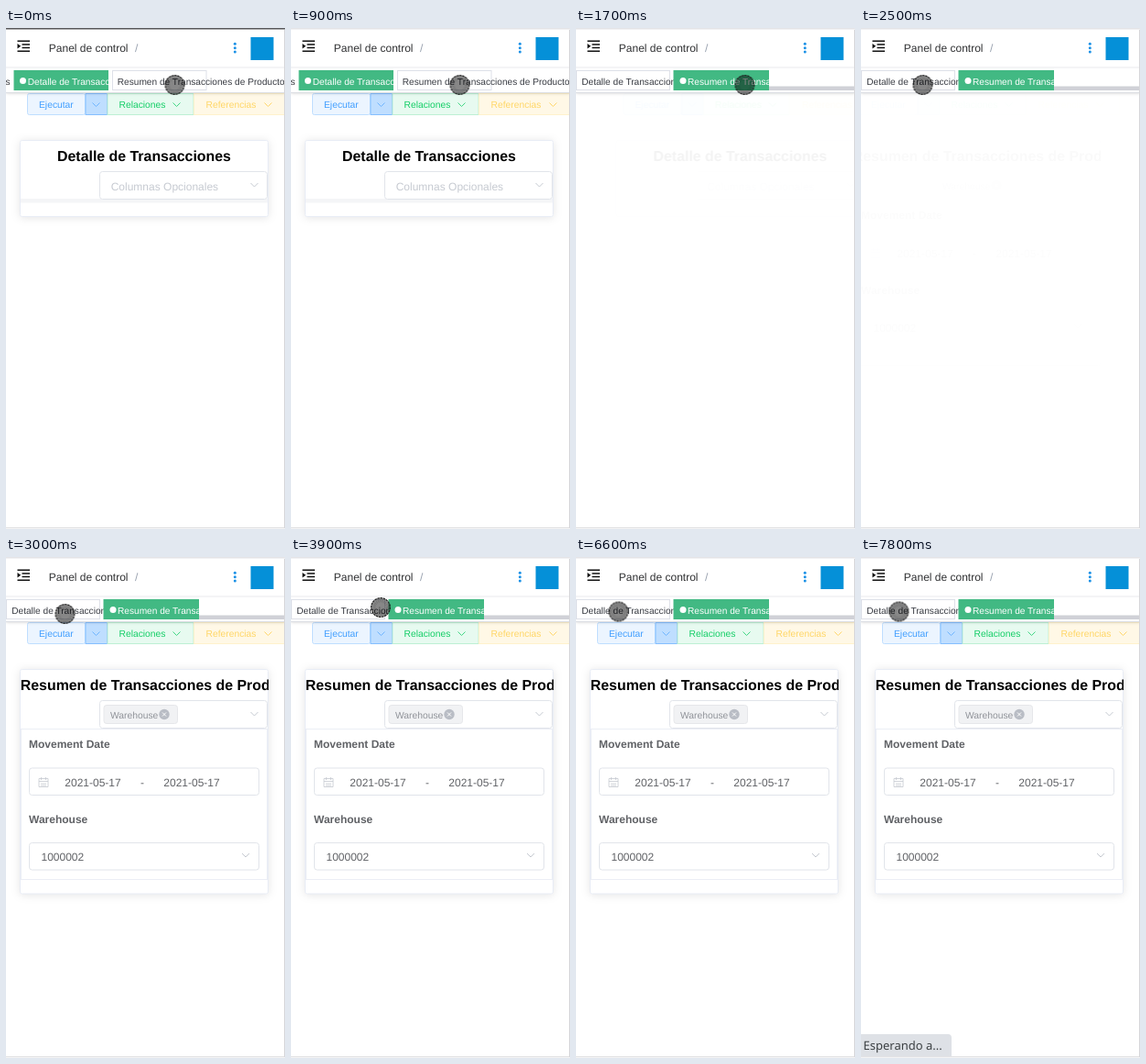
An HTML page that plays this animation: 305 by 546 pixels, repeating every 8000 ms.

```html
<!DOCTYPE html>
<html lang="es">
<head>
<meta charset="utf-8">
<title>Panel de control</title>
<style>
html, body { margin: 0; width: 100%; height: 100%; overflow: hidden; background: #fff; }
svg { display: block; width: 305px; height: 546px; }
text {
  font: 12px "Liberation Sans", Arial, sans-serif; fill: #303133;
  white-space: pre; text-rendering: geometricPrecision;
}
.title { font-size: 15.9px; font-weight: bold; fill: #000; }
.label { font-weight: bold; fill: #606266; }
.value { fill: #606266; }
.hint { fill: #c6cad1; }
.btn text { font-size: 10.3px; }
.tab text { font-size: 10.15px; fill: #3a3d44; }
.tab rect { fill: #fff; stroke: #dde0e8; }
.on text { fill: #fff; }
.on rect { fill: #42b983; stroke: #42b983; }
.on circle { fill: #fff; }
.chev { fill: none; stroke: #c6cad1; }
.card { fill: #fff; stroke: #e8ecf5; filter: drop-shadow(0 1px 5px rgba(0,0,0,.1)); }
.box { fill: #fff; stroke: #e1e4ea; }
.tip { font: 13px "Noto Sans", "Open Sans", sans-serif; fill: #3c4043; }

.top, .before, .after, .tap, .glow, .bar, .old, .new, .cursor, .status {
  animation: 8s step-end infinite;
}
.top { animation-name: top; }
.before { animation-name: before; }
.after { animation-name: after; }
.tap { animation-name: tap; }
.glow { animation-name: glow; }
.bar { animation-name: bar; }
.old { animation-name: leave; }
.new { animation-name: enter; }
.cursor { animation-name: cursor; }
.status { animation-name: status; }

@keyframes top { 0% { fill: #58585b; } 11.25%, 100% { fill: #e4e4e7; } }
@keyframes before { 0% { opacity: 1; } 17.5%, 100% { opacity: 0; } }
@keyframes after { 0% { opacity: 0; } 17.5%, 100% { opacity: 1; } }
@keyframes tap {
  0% { opacity: 0; } 17.5% { opacity: .4; } 18.75% { opacity: .3; }
  20% { opacity: .15; } 21.25%, 100% { opacity: 0; }
}
@keyframes glow { 0% { opacity: 0; } 17.5% { opacity: 1; } 20%, 100% { opacity: 0; } }
@keyframes bar { 0% { opacity: 0; } 18.75%, 100% { opacity: 1; } }
@keyframes leave {
  0% { opacity: 1; transform: none; }
  17.5% { opacity: .82; transform: translateX(4px); }
  18.75% { opacity: .38; transform: translateX(18.5px); }
  20% { opacity: .16; transform: translateX(25px); }
  21.25% { opacity: .05; transform: translateX(28.5px); }
  22.5%, 100% { opacity: 0; transform: translateX(30px); }
}
@keyframes enter {
  0% { opacity: 0; transform: translateX(-30px); }
  22.5% { opacity: .02; transform: translateX(-25px); }
  36.25% { opacity: .93; transform: translateX(-1px); }
  37.5%, 100% { opacity: 1; transform: none; }
}
@keyframes cursor {
  0% { transform: translate(184.5px, 62px); }
  27.5% { transform: translate(176px, 62px); }
  28.75% { transform: translate(146px, 62px); }
  30% { transform: translate(95px, 62px); }
  31.25% { transform: translate(67.5px, 62px); }
  36.25% { transform: translate(65px, 62px); }
  37.5% { transform: translate(64.5px, 62px); }
  47.5% { transform: translate(75px, 60px); }
  48.75% { transform: translate(98px, 55px); }
  50% { transform: translate(80px, 52px); }
  51.25% { transform: translate(56px, 52px); }
  53.75% { transform: translate(119px, 51px); }
  56.25% { transform: translate(132.5px, 52px); }
  82.5% { transform: translate(46.5px, 59.5px); }
  83.75% { transform: translate(43px, 60px); }
  85%, 100% { transform: translate(41.5px, 59.5px); }
}
@keyframes status { 0% { opacity: 0; } 97.5%, 100% { opacity: 1; } }
</style>
</head>
<body>
<svg viewBox="0 0 305 546">
  <defs>
    <path id="chev" d="M-4-2L0 2L4-2"/>
    <g id="buttons" class="btn">
      <rect x="23.5" y="71.5" width="63" height="23" rx="2" fill="#ecf5ff" stroke="#bfdeff"/>
      <rect x="87" y="71.5" width="23.5" height="23" fill="#bfdeff" stroke="#85bfff"/>
      <rect x="111" y="71.5" width="94" height="23" fill="#e7faf0" stroke="#bdf0d4"/>
      <rect x="205.5" y="71.5" width="102" height="23" fill="#fff8e6" stroke="#fff1cc"/>
      <text x="36" y="87" style="fill:#409eff">Ejecutar</text>
      <text x="123.5" y="87" style="fill:#13ce66">Relaciones</text>
      <text x="218.5" y="87" style="fill:#ffd666">Referencias</text>
      <g fill="none">
        <use href="#chev" x="98.5" y="83.5" stroke="#6db4ff"/>
        <use href="#chev" x="186.5" y="83.5" stroke="#3fd783"/>
        <use href="#chev" x="286.5" y="83.5" stroke="#ffd666"/>
      </g>
    </g>
    <clipPath id="cardClip"><rect x="15" y="122" width="272" height="250"/></clipPath>
    <clipPath id="tabClip"><rect x="107" y="46" width="104" height="23"/></clipPath>
  </defs>

  <g class="old">
    <use href="#buttons"/>
    <rect class="card" x="15.5" y="122.5" width="271" height="83" rx="2"/>
    <text class="title" x="151" y="145" text-anchor="middle">Detalle de Transacciones</text>
    <rect x="16" y="186" width="270" height="4.5" fill="#f4f5f7"/>
    <rect class="box" x="102.5" y="156.5" width="183" height="30" rx="3"/>
    <text class="hint" x="114.700" y="176.500">Columnas Opcionales</text>
    <use href="#chev" class="chev" x="271.5" y="171"/>
  </g>

  <g class="new">
    <use href="#buttons"/>
    <rect class="card" x="15.5" y="122.5" width="271" height="244.5" rx="2"/>
    <g clip-path="url(#cardClip)">
      <text class="title" x="15.8" y="145">Resumen de Transacciones de Producto</text>
    </g>
    <rect x="16.5" y="187.5" width="269" height="164" fill="none" stroke="#ebeef5"/>
    <rect class="box" x="102.5" y="156.5" width="183" height="30" rx="3"/>
    <rect x="107" y="161.5" width="80.5" height="20" rx="3" fill="#f1f2f4" stroke="#e6e7ea"/>
    <text x="114" y="175.5" style="font-size:10.3px;fill:#909399">Warehouse</text>
    <circle cx="173" cy="171.5" r="5.7" fill="#b9bdc5"/>
    <path d="M171 169.500l4 4m0-4l-4 4" stroke="#fff"/>
    <use href="#chev" class="chev" x="271.5" y="171"/>

    <text class="label" x="25" y="207.5">Movement Date</text>
    <rect class="box" x="25.5" y="230" width="251" height="29.5" rx="3"/>
    <path d="M36 241.500h10v9h-10zM36 244.500h10M38.500 240v3M43.500 240v3M38 247h6M38 249h6" fill="none" stroke="#c6cad1" stroke-width=".8"/>
    <g text-anchor="middle">
      <text class="value" x="95" y="249.5">2021-05-17</text>
      <text class="value" x="149" y="249.5">-</text>
      <text class="value" x="203" y="249.5">2021-05-17</text>
    </g>

    <text class="label" x="25" y="289.8">Warehouse</text>
    <rect class="box" x="25.5" y="311.5" width="251" height="29.5" rx="3"/>
    <text class="value" x="38.5" y="330.5">1000002</text>
    <use href="#chev" class="chev" x="262" y="325"/>
  </g>

  <rect width="305" height="70.5" fill="#fff" style="filter:drop-shadow(0 1px 1.500px rgba(0,0,0,.15))"/>
  <path d="M0 43h305" stroke="#f0f0f3" stroke-width="1.5"/>
  <path d="M0 70.500h305" stroke="#dcdee3"/>
  <path class="glow" d="M0 2H177Q172 5 150 5Q90 3.500 0 3.500Z" fill="#eef0f3"/>
  <rect class="top" width="305" height="1.5"/>

  <path d="M12.500 14.300h13.500M17.500 18h8.500M17.500 21.500h8.500M12.500 25.200h13.500" stroke="#111" stroke-width="1.4"/>
  <path d="M12.500 17l3.700 2.800l-3.700 2.800z" fill="#111"/>
  <text x="46.800" y="26">Panel de control</text>
  <text x="141" y="26" style="fill:#97a0ae">/</text>
  <g fill="#1b91e6">
    <circle cx="250.3" cy="17.3" r="1.5"/>
    <circle cx="250.3" cy="21.7" r="1.5"/>
    <circle cx="250.3" cy="26.1" r="1.5"/>
  </g>
  <rect x="267.5" y="10" width="25" height="25" fill="#0590d8"/>

  <g class="before">
    <g class="tab"><text x="-.5" y="62">s</text></g>
    <g class="tab on">
      <rect x="9" y="46.5" width="102.5" height="21"/>
      <circle cx="18.5" cy="57.5" r="3.5"/>
      <text x="23.8" y="62">Detalle de Transacciones</text>
    </g>
    <g class="tab">
      <rect x="112" y="46" width="4" height="23" style="fill:#fff;stroke:none"/>
      <rect x="116.5" y="46.5" width="102.5" height="21"/>
      <text x="121.8" y="62">Resumen de Transacciones de Producto</text>
    </g>
  </g>
  <g class="after">
    <g class="tab">
      <rect x=".5" y="46.5" width="102" height="21"/>
      <text x="6.2" y="62">Detalle de Transacciones</text>
    </g>
    <rect class="bar" x="211" y="63.5" width="93" height="4.5" fill="#d0d1d7"/>
    <g class="tab on">
      <rect x="107" y="46.5" width="103.5" height="21"/>
      <circle cx="117" cy="57.5" r="3.5"/>
      <text x="122" y="62" clip-path="url(#tabClip)">Resumen de Transacciones de Producto</text>
    </g>
    <rect class="tap" x="106.5" y="47" width="198" height="21" fill="#33b5e5"/>
  </g>

  <path d="M304.500 2V545M0 544.800H305" stroke="#d6d6d9"/>

  <g class="status">
    <path d="M0 520H95Q99 520 99 524V544H0Z" fill="#dee1e6"/>
    <text class="tip" x="2.5" y="537">Esperando a...</text>
  </g>

  <g class="cursor">
    <circle r="10.8" fill="#000" fill-opacity=".47"/>
    <circle r="10.3" fill="none" stroke="#222" stroke-width="1.2" stroke-dasharray="2 1.2"/>
    <circle r="7" fill="none" stroke="#000" stroke-opacity=".15" stroke-width="3" stroke-dasharray="1 1"/>
  </g>
</svg>
</body>
</html>
```
